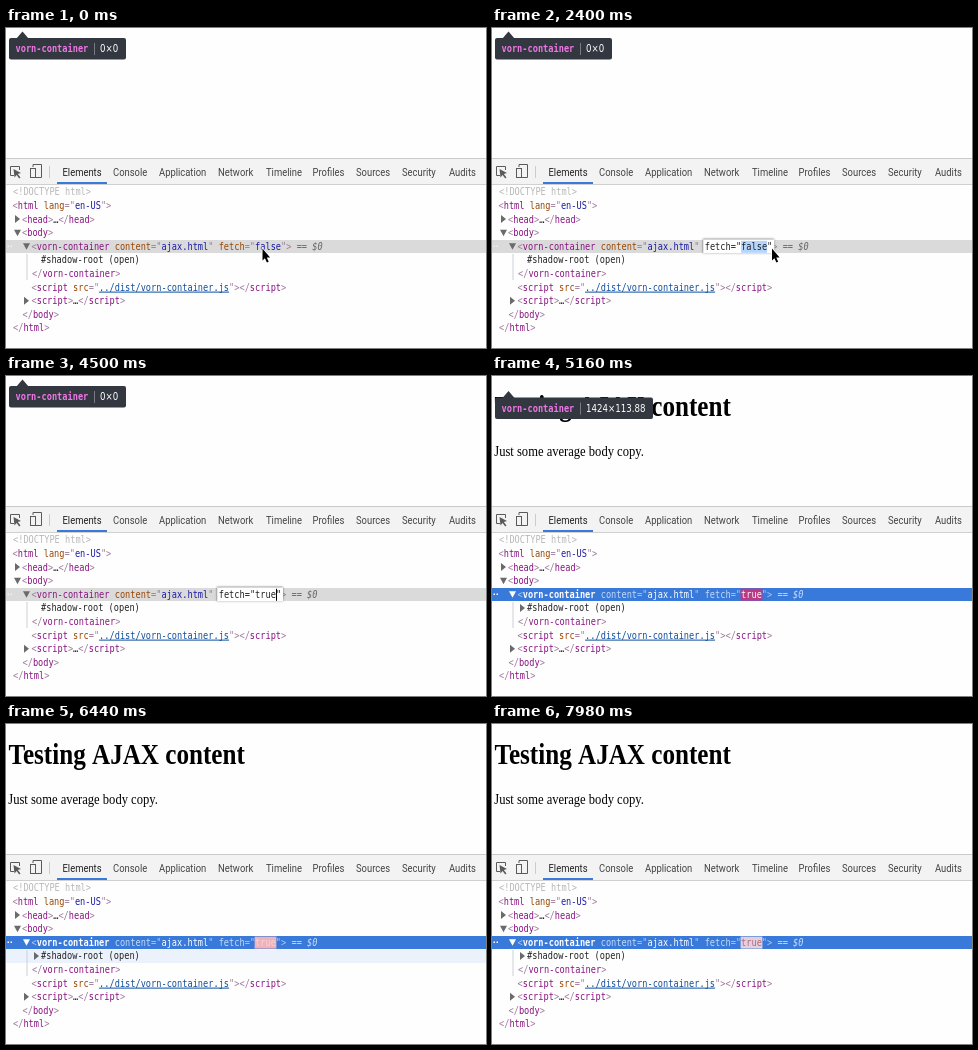
An HTML page with a canvas for the animation above (8000 ms loop, 480 by 320 pixels).

```html
<!DOCTYPE html>
<html lang="en">
<head>
<meta charset="utf-8">
<title>Attribute editing</title>
<style>
html, body { margin: 0; width: 100%; height: 100%; overflow: hidden; background: #fefefe; }
canvas { display: block; }
</style>
</head>
<body>
<canvas width="480" height="320"></canvas>
<script>
const ctx = document.querySelector('canvas').getContext('2d');
const LOOP = 8000, SX = 0.785, SY = 0.907, ROW = 13.6, CHAR = 5.2;
const TAG = 'vorn-container';
const MONO = '11px "DejaVu Sans Mono", monospace';
const SANS = '12px Roboto, sans-serif';
const SERIF = '"Liberation Serif", serif';

const EDIT = 1000, COMMIT = 4880, TOOLTIP_END = 6200;
const KEYS = [3700, 3850, 3980, 4120];

const LIGHT = { punct: '#a07c9c', tag: '#881280', attr: '#994500', value: '#1a1aa6', text: '#222', dim: '#666', link: '#0f4f9e' };
const FOCUS = { ...LIGHT, punct: '#a9c8f2', tag: '#fff', attr: '#c4dcf8', value: '#fff', dim: '#c8dcf8' };

function rect(x, y, w, h, color) {
  ctx.fillStyle = color;
  ctx.fillRect(x, y, w, h);
}

function shape(points, color, outline) {
  ctx.beginPath();
  points.forEach(([x, y]) => ctx.lineTo(x, y));
  ctx.closePath();
  if (outline) {
    ctx.strokeStyle = outline;
    ctx.lineWidth = 1.6;
    ctx.stroke();
  }
  ctx.fillStyle = color;
  ctx.fill();
}

function line(points, color, width = 1) {
  ctx.beginPath();
  points.forEach(([x, y]) => ctx.lineTo(x, y));
  ctx.strokeStyle = color;
  ctx.lineWidth = width;
  ctx.stroke();
}

// The whole picture is squeezed sideways, so all text shares one scale.
function text(string, x, y, font, color) {
  ctx.save();
  ctx.translate(x, y);
  ctx.scale(SX, SY);
  ctx.font = font;
  ctx.fillStyle = color;
  ctx.fillText(string, 0, 0);
  const width = ctx.measureText(string).width * SX;
  ctx.restore();
  return width;
}

const rowTop = n => 157.4 + ROW * n;

function code(row, x, runs, colors = LIGHT) {
  for (const [string, kind, style = ''] of runs) {
    const width = text(string, x, rowTop(row) + 9.9, style + MONO, colors[kind]);
    if (kind === 'link') rect(x, rowTop(row) + 11, width, 1, colors.link);
    x += width;
  }
}

const open = name => [['<', 'punct'], [name, 'tag'], ['>', 'punct']];
const close = name => [['</', 'punct'], [name, 'tag'], ['>', 'punct']];
const attr = (name, value) => [[' ' + name, 'attr'], ['="', 'punct'], [value, 'value'], ['"', 'punct']];
const folded = name => [...open(name), ['…', 'text'], ...close(name)];

function arrow(row, x, expanded, color = '#6a6a6a') {
  const y = rowTop(row) + 6.5;
  shape(expanded ? [[x, y - 3], [x + 7, y - 3], [x + 3.5, y + 3.5]]
                 : [[x + 1, y - 4], [x + 6, y], [x + 1, y + 4]], color);
}

function mix(stops, t) {
  let i = 1;
  while (i < stops.length - 1 && t > stops[i][0]) i++;
  const [t0, a] = stops[i - 1], [t1, b] = stops[i];
  const k = Math.min(1, Math.max(0, (t - t0) / (t1 - t0)));
  return `rgb(${a.map((v, j) => Math.round(v + (b[j] - v) * k))})`;
}

function drawPage() {
  text('Testing AJAX content', 2.5, 40.3, 'bold 32px ' + SERIF, '#000');
  text('Just some average body copy.', 2.3, 79.8, '16px ' + SERIF, '#000');
}

function drawTooltip(top, size, right) {
  const dark = '#333740';
  shape([[10, top + 1], [16.5, top - 6.5], [23, top + 1]], dark);
  ctx.beginPath();
  ctx.roundRect(3, top, right - 3, 21.5, 2);
  ctx.fillStyle = dark;
  ctx.fill();
  text(TAG, 9.5, top + 14, 'bold ' + MONO, '#ee78e6');
  rect(88, top + 5, 1, 12, '#777a84');
  text(size, 94, top + 14, '11px "DejaVu Sans", sans-serif', '#fff');
}

function drawToolbar() {
  rect(0, 130, 480, 26.5, '#f3f3f3');
  rect(0, 130, 480, 1, '#cacaca');
  rect(0, 156, 480, 1, '#d0d0d0');
  rect(51, 154, 50, 2, '#3879d9');

  const ink = '#5a5a5a';
  line([[8, 147.5], [4.5, 147.5], [4.5, 138.5], [13.5, 138.5], [13.5, 142]], ink);
  shape([[7.5, 141], [15, 145], [11.8, 146], [14.5, 149.5], [13.2, 150.5], [10.6, 147], [8.5, 149.5]], ink);
  line([[27, 139], [27, 136.5], [35.5, 136.5], [35.5, 149.5], [30, 149.5]], ink);
  ctx.strokeRect(24.5, 140.5, 5, 9);
  rect(43, 138, 1, 12, '#ccc');

  const tabs = { Elements: 56.5, Console: 107, Application: 153, Network: 212, Timeline: 260,
                 Profiles: 306.5, Sources: 350, Security: 396, Audits: 443 };
  for (const name in tabs) text(name, tabs[name], 147.6, SANS, name === 'Elements' ? '#222' : '#444');
}

function drawSelectedRow(t) {
  const editing = t >= EDIT && t < COMMIT, done = t >= COMMIT;
  const typed = KEYS.filter(k => t >= k).length;
  const value = typed ? 'true'.slice(0, typed) : 'false';
  const colors = done ? FOCUS : LIGHT;
  const top = rowTop(4), x = 25.5;
  const fieldX = x + 36 * CHAR, valueX = x + 43 * CHAR, endX = valueX + value.length * CHAR;

  rect(0, 212, 480, 13, done ? '#3879d9' : '#dadada');
  for (const dot of [1.5, 4.5]) rect(dot, 217.5, 1.5, 1.5, done ? '#fff' : '#f4f4f4');
  arrow(4, 17, true, done ? '#fff' : undefined);

  const weight = done ? 'bold ' : '';
  code(4, x, [['<', 'punct'], [TAG, 'tag', weight], ...attr('content', 'ajax.html'),
              ...attr('fetch', value), ['>', 'punct'], [' == ', 'dim'], ['$0', 'dim', 'italic ']], colors);

  if (editing) {
    ctx.save();
    ctx.shadowColor = 'rgba(0,0,0,.6)';
    ctx.shadowBlur = 2;
    rect(fieldX - 1.5, top - 0.4, endX + CHAR - fieldX + 3.5, 14, '#fff');
    ctx.restore();
    if (!typed) rect(valueX, top + 1, 5 * CHAR, 12, '#b4d5fe');
    code(4, fieldX, [[`fetch="${value}"`, 'text']]);
    if (typed) rect(Math.round(endX), top + 1, 1, 12, '#000');
  }
  if (done) {
    const back = mix([[5160, [186, 58, 134]], [6440, [238, 178, 186]], [7980, [226, 208, 222]]], t);
    const ink = mix([[5160, [255, 245, 250]], [6440, [246, 212, 216]], [7980, [178, 104, 124]]], t);
    rect(valueX - 0.5, top + 0.8, 4 * CHAR + 1, 12, back);
    text(value, valueX, top + 9.9, MONO, ink);
  }
}

function drawTree(t) {
  const done = t >= COMMIT;
  const hovered = t >= 6400 && t < 6500 ? 5 : t >= 6500 && t < 6620 ? 3 : -1;
  if (hovered >= 0) rect(0, rowTop(hovered), 480, ROW, '#ebf2fc');
  if (hovered === 3) rect(11.5, 226, 1, 53, '#dce4f0');

  code(0, 7, [['<!DOCTYPE html>', 'dim']], { dim: '#b8b8b8' });
  code(1, 6.5, [['<', 'punct'], ['html', 'tag'], ...attr('lang', 'en-US'), ['>', 'punct']]);
  arrow(2, 8, false);
  code(2, 16, folded('head'));
  arrow(3, 8, true);
  code(3, 16, open('body'));
  drawSelectedRow(t);
  rect(20.5, 226, 1, 26, '#ccd0d8');
  if (done) arrow(5, 27, false);
  code(5, 35, [['#shadow-root (open)', 'text']]);
  code(6, 26, close(TAG));
  code(7, 25.5, [['<', 'punct'], ['script', 'tag'], [' src', 'attr'], ['="', 'punct'],
                 [`../dist/${TAG}.js`, 'link'], ['">', 'punct'], ...close('script')]);
  arrow(8, 17, false);
  code(8, 25.5, folded('script'));
  code(9, 16.5, close('body'));
  code(10, 7, close('html'));
}

function drawPointer(t) {
  if (t >= KEYS[0]) return;
  const k = Math.min(1, Math.max(0, (t - 1250) / 650));
  const x = 256.5 + 23.5 * k * k * (3 - 2 * k), y = 220.5;
  const outline = [[0, 0], [0, 12], [2.4, 9.7], [4.4, 14], [6.2, 13.2], [4.3, 9], [7.6, 9]];
  shape(outline.map(([dx, dy]) => [x + dx, y + dy]), '#000', '#fff');
}

function frame() {
  const t = performance.now() % LOOP;
  rect(0, 0, 480, 320, '#fefefe');
  if (t >= COMMIT) drawPage();
  if (t < COMMIT) drawTooltip(10, '0×0', 120);
  else if (t < TOOLTIP_END) drawTooltip(21.5, '1424×113.88', 161);
  drawToolbar();
  drawTree(t);
  drawPointer(t);
  requestAnimationFrame(frame);
}
frame();
</script>
</body>
</html>
```
